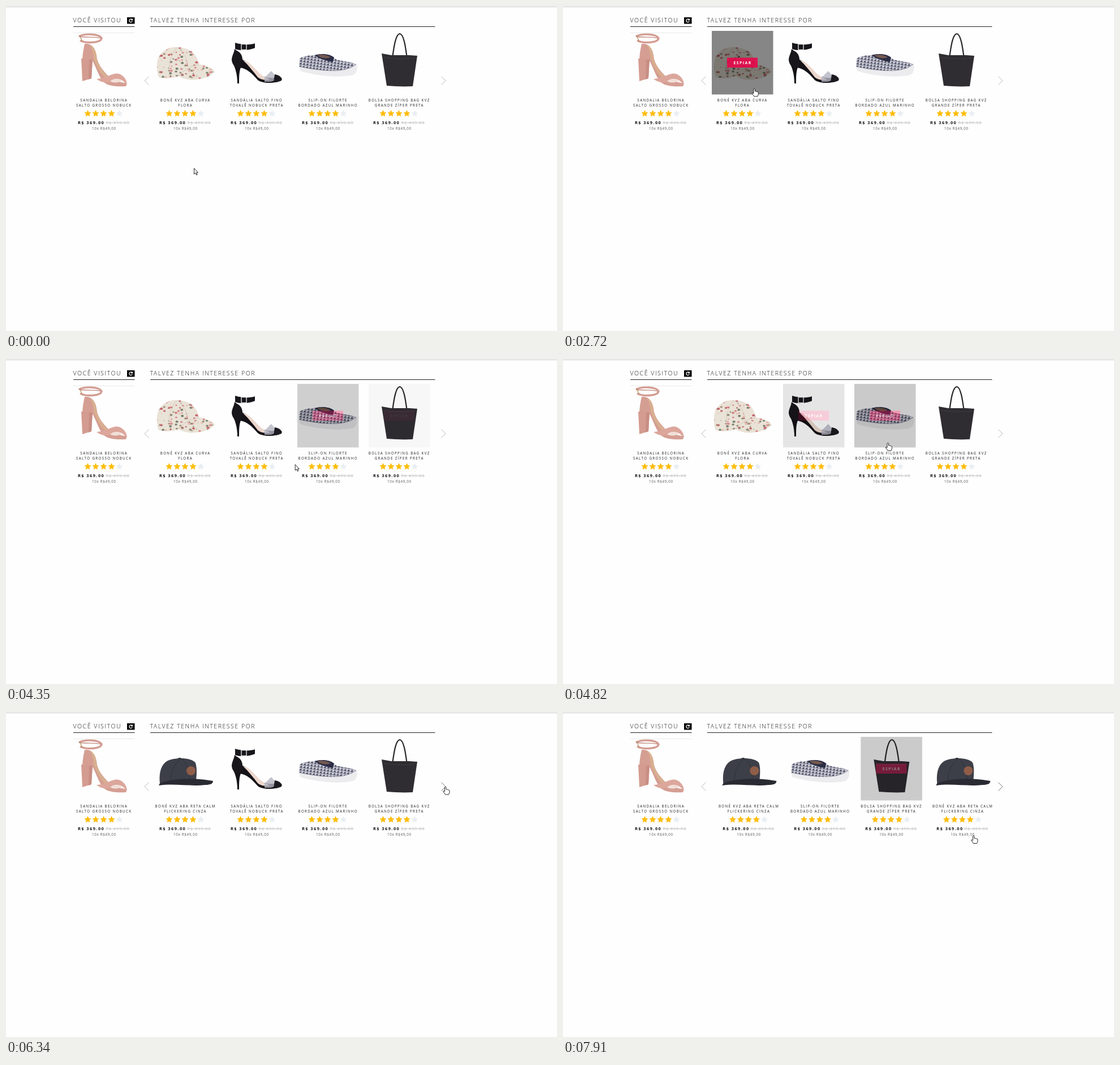
An HTML page for the animation above (8000 ms loop, 974 by 575 pixels).

```html
<!DOCTYPE html>
<html lang="pt-BR">
<head>
<meta charset="utf-8">
<title>Vitrine</title>
<style>
html, body { margin: 0; width: 100%; height: 100%; overflow: hidden; background: #fefefe; }
svg { display: block; width: 974px; height: 575px; font-family: "Open Sans", "Noto Sans", sans-serif; }
.head { font-size: 10.5px; font-weight: 300; letter-spacing: 1.55px; fill: #111; }
.name { font-size: 6.2px; letter-spacing: 1.38px; fill: #222; text-anchor: middle; }
.price { font-size: 7.4px; font-weight: 700; letter-spacing: 1.45px; fill: #111; }
.old { font-size: 7px; letter-spacing: 1.12px; fill: #bbb; }
.part { font-size: 6.2px; letter-spacing: .7px; fill: #555; text-anchor: middle; }
.peek { font-size: 6.8px; font-weight: 700; letter-spacing: 1.5px; fill: #fff; text-anchor: middle; }
</style>
</head>
<body>
<svg id="stage" viewBox="0 0 974 575"></svg>
<script>
const stage = document.getElementById('stage');
const STEP = 126, PAGE = 4 * STEP, FADE = 300, LOOP = 8000;
const clamp = (v, lo = 0, hi = 1) => Math.min(hi, Math.max(lo, v));
const path = (d, fill, extra = '') => `<path d="${d}" fill="${fill}" ${extra}/>`;
const line = (d, color, width) => path(d, 'none', `stroke="${color}" stroke-width="${width}"`);

let seed = 7;
const rand = () => (seed = seed * 16807 % 2147483647) / 2147483647;

const capShape = 'M-50 104C-50 88-38 74-20 73C5 72 20 82 24 103C36 105 50 110 52 117C46 122 36 129 20 130C5 132-5 128-12 124C-28 130-40 128-47 126C-50 120-50 110-50 104Z';
const slipUpper = 'M-50 93C-42 88-32 87-23 87C-10 83 4 85 10 91C16 98 36 97 50 103C44 108 36 112 20 114C0 116-30 112-51 107Z';

function flowers() {
  const tones = ['#d98f90', '#c4666c', '#77806c', '#e6b5ae', '#97907c'];
  let out = '';
  for (let i = 0; i < 130; i++) {
    const x = -50 + rand() * 102, y = 73 + rand() * 57, r = .8 + rand() * 1.9;
    out += `<ellipse cx="${x.toFixed(1)}" cy="${y.toFixed(1)}" rx="${r.toFixed(1)}" ry="${(r * .75).toFixed(1)}" fill="${tones[i % 5]}"/>`;
  }
  return out;
}

// Product pictures, drawn around x = 0
const pictures = {
  sandal: '<path d="M-54 47.5H54" stroke="#eaeaea"/>' +
    path('M-34 67C-20 65-13 78-12 94C-8 108 2 118 12 128C22 134 32 135 41 137L39 142C22 143 6 142-2 133C-10 122-14 108-20 97L-38 97C-38 86-36 76-34 67Z', '#d59e93') +
    path('M-25 69C-15 73-13 84-13 94C-8 108 0 118 9 127L3 128C-8 116-14 104-18 94C-18 84-20 76-25 69Z', '#d8b08f') +
    path('M-40 93L-20 94-22 128-38 133Z', '#d49c91') +
    path('M-20 95L-22 128-27 130-26 95Z', '#c88e84') +
    path('M-13 129C8 127 16 117 27 120C37 124 42 134 40 139C34 131 28 128 22 130C10 136-2 138-13 129Z', '#dca69b') +
    path('M11 133C17 128 25 127 32 132C27 136 18 137 11 133Z', '#f1dfd7') +
    line('M-44 54C-34 48-8 49-4 57C-5 65-30 67-42 61', '#d49c92', 3.4) +
    line('M-44 54C-30 56-14 54-5 57', '#c48a80', 1.3) +
    line('M-43 52L-38 63', '#b89468', 1.3),
  floral: path(capShape, '#e9e2d6') + `<g clip-path="url(#capClip)">${flowers()}</g>` +
    line('M24 104C8 106-4 114-12 124M-14 73C-2 84 4 95 5 108M-14 73C-28 86-30 105-28 126', '#cfc5b8', .8),
  heel: path('M-28 94C-10 98-2 118 12 125C24 129 36 126 44 127L44 132C30 138 10 137 2 131C-8 119-18 110-30 109Z', '#141216') +
    path('M-24 96C-8 99 0 118 13 125L24 130C14 132 7 130 2 126C-6 116-14 105-24 96Z', '#ecd7cd') +
    path('M-43 100L-26 105C-31 112-31 125-31 137H-34C-34 120-38 108-43 100Z', '#141216') +
    path('M-39 76L-35 79C-24 84-23 96-27 108C-32 112-42 108-44 96C-44 88-40 84-39 76Z', '#18161a') +
    path('M-38 65C-25 69-10 69-3 66V74C-12 78-28 80-38 76Z', '#18161a') +
    '<rect x="-27" y="67.5" width="9" height="10" fill="none" stroke="#eee" stroke-width="1.3"/>' +
    path('M14 126C20 122 23 117 26 115L33 123 31 132C25 135 20 134 14 134Z', '#b4b4c2', 'opacity=".8"') +
    path('M32 121C40 122 44 126 45 130C40 134 36 135 30 135Z', '#1c1a20'),
  slip: path('M-51 106C-30 112 0 116 20 114C36 112 44 107 51 102C53 110 51 119 45 122C20 128-25 123-49 115Z', '#ececee') +
    path(slipUpper, '#d9d9e0') + path(slipUpper, 'url(#weave)') +
    path('M-24 87C-10 83 4 85 11 91L9 99C-2 98-15 93-24 87Z', '#2c2e46') +
    path('M-19 87C-9 85 0 87 5 91C-4 94-13 92-19 87Z', '#765a50') +
    line('M-51 107C-30 112 0 116 20 114C36 112 44 108 50 103', '#77788a', .6),
  bag: line('M-12 92C-9 70-6 50 1 49C8 50 11 70 14 93', '#29262a', 2.2) +
    path('M-31 84L-14 87H18L32 88 24 142C8 143-8 142-22 141Z', '#302d32') +
    line('M-28 91C-8 94 12 94 28 92', '#424046', .8),
  grey: path('M-45 126C-47 105-42 88-25 84C-8 80 12 82 18 90C21 100 20 110 19 122Z', '#3d3f48') +
    line('M-8 82C-20 92-26 108-26 124M-8 82C3 90 8 105 8 120', '#2d2f37', .8) +
    path('M-45 126C-20 116 22 117 49 122C49 127 44 129 35 129C10 132-20 126-47 130Z', '#2a2a32') +
    '<circle cx="10" cy="104" r="8" fill="#8f5d48"/><ellipse cx="-10" cy="82" rx="3" ry="1" fill="#2a2a32"/>'
};

const titles = {
  sandal: ['SANDALIA BELORINA', 'SALTO GROSSO NOBUCK'],
  floral: ['BONÉ KVZ ABA CURVA', 'FLORA'],
  heel: ['SANDÁLIA SALTO FINO', 'TOVALÊ NOBUCK PRETA'],
  slip: ['SLIP-ON FILORTE', 'BORDADO AZUL MARINHO'],
  bag: ['BOLSA SHOPPING BAG KVZ', 'GRANDE ZÍPER PRETA'],
  grey: ['BONÉ KVZ ABA RETA CALM', 'FLICKERING CINZA']
};

function star(cx, color) {
  let pts = '';
  for (let i = 0; i < 10; i++) {
    const r = i % 2 ? 2.8 : 5.8, a = i * Math.PI / 5;
    pts += `${(cx + r * Math.sin(a)).toFixed(2)},${(190.4 - r * Math.cos(a)).toFixed(2)} `;
  }
  return `<polygon points="${pts}" fill="${color}" stroke="${color}" stroke-width=".6" stroke-linejoin="round"/>`;
}

function card(kind, x) {
  const stars = [-28.5, -14.5, -.5, 13.5, 27.5].map((sx, i) => star(sx, i < 4 ? '#fdbd0b' : '#e9eef3')).join('');
  return `<g transform="translate(${x})">${pictures[kind]}
    <g class="veil" opacity="0">
      <rect x="-54" y="44" width="108.5" height="112.5" fill="#000" opacity=".5"/>
      <rect x="-27" y="91.5" width="54" height="17.5" fill="#dc0546"/>
      <text class="peek" x=".5" y="103">ESPIAR</text>
    </g>
    <text class="name" x=".2" y="169">${titles[kind][0]}</text>
    <text class="name" x=".2" y="177.5">${titles[kind][1]}</text>${stars}
    <text class="price" x="-46" y="208.7">R$ 369.00</text>
    <text class="old" x="3.5" y="208.5">R$ 499.00</text>
    <path d="M3.5 206.5H45" stroke="#bbb" stroke-width=".8"/>
    <text class="part" x=".3" y="219.3">10x R$49,00</text></g>`;
}

const row = ('floral heel slip bag grey heel slip bag ' +
  'heel slip bag grey grey slip bag grey').split(' ');

stage.innerHTML = `<defs>
  <clipPath id="window"><rect x="255" y="40" width="504" height="200"/></clipPath>
  <clipPath id="capClip"><path d="${capShape}"/></clipPath>
  <pattern id="weave" width="6" height="5" patternUnits="userSpaceOnUse" patternTransform="rotate(8)">
    <path d="M0 4L3 0 5 4ZM4 .5H6M0 4.5H6" fill="#44465f" stroke="#7b7d90" stroke-width=".4"/></pattern></defs>
  <rect width="974" height="575" fill="#fefefe"/>
  <path d="M0 1.5H974" stroke="#c9c9c9"/>
  <text class="head" x="118.5" y="28.7">VOCÊ VISITOU</text>
  <text class="head" x="254.5" y="28.7">TALVEZ TENHA INTERESSE POR</text>
  <path d="M119 36.5H227.5M255 36.5H758.5" stroke="#222"/>
  <rect x="214" y="20" width="13.5" height="11.5" fill="#000"/>
  <path d="M222.6 23.8A2.8 2.8 0 1 0 223.2 27" fill="none" stroke="#fff" stroke-width="1.3"/>
  <path d="M224 22V25.6H220.4Z" fill="#fff"/>
  ${card('sandal', 173)}
  <g clip-path="url(#window)"><g id="track">${row.map((k, i) => card(k, 317 + i * STEP)).join('')}</g></g>
  <path d="M252.5 124.5L245 132 252.5 139.5" fill="none" stroke="#bbb"/>
  <path id="next" d="M769.5 124.5L777 132 769.5 139.5" fill="none"/>
  <circle id="click" cx="776" cy="132" r="8" fill="#fff200" opacity=".65"/>
  <g id="cursor" stroke="#111" stroke-width=".9" stroke-linejoin="round" fill="#fff">
    <path id="arrow" d="M.5 0V10.5L2.9 8.3 4.6 12 6.2 11.3 4.6 7.8H7.5Z"/>
    <path id="hand" d="M-1.5 1Q-.2-.6 1 1V5Q2.4 3.9 3.2 5.6Q4.6 4.5 5.2 6.2Q6.7 5.5 7 7.4V10Q6.6 12 5.6 14H-.5Q-2.2 11.3-4.3 8.6Q-4.4 6.6-1.5 8.8Z"/>
  </g>`;

const el = id => document.getElementById(id);
const veils = [...document.querySelectorAll('.veil')];
const show = (id, on) => el(id).style.display = on ? '' : 'none';

// [veil, pointer enters, pointer leaves]
const hovers = [
  [0, 1250, 2050], [1, 2440, 2790], [2, 2880, 3080], [3, 3130, 3360],
  [4, 3760, 4068], [3, 4080, 4270], [2, 4440, 4660], [3, 4700, 4900],
  [4, 4930, 5390], [15, 7790, 7990]
];

// [time, x, y] of the pointer tip
const moves = [
  [860, 332, 287], [1020, 310, 264], [1400, 205, 162], [1610, 186, 141],
  [1840, 186, 141], [2080, 228, 185], [2200, 255, 196], [2420, 310, 168], [2630, 338, 146],
  [2720, 338, 146], [2900, 405, 148], [3180, 548, 150], [3460, 644, 178],
  [3500, 644, 178], [3680, 690, 211], [3800, 700, 150], [4080, 610, 130], [4270, 530, 165], [4350, 511, 187],
  [4460, 478, 150], [4600, 462, 142], [4760, 545, 150], [5080, 700, 140],
  [5130, 700, 140], [5350, 742, 145], [5450, 760, 134], [5900, 777, 132],
  [7390, 777, 132], [7600, 765, 140], [7800, 738, 165], [7910, 726, 218.5]
];

function pointer(t) {
  const i = moves.findIndex(m => m[0] > t);
  if (i === 0) return moves[0].slice(1);
  if (i < 0) return moves.at(-1).slice(1);
  const [a, b] = [moves[i - 1], moves[i]], p = (t - a[0]) / (b[0] - a[0]);
  return [a[1] + (b[1] - a[1]) * p, a[2] + (b[2] - a[2]) * p];
}

const swing = (t, start, end) => .5 - Math.cos(Math.PI * clamp((t - start) / (end - start))) / 2;

function hover(t, enter, leave) {
  const peak = Math.min(1, (leave - enter) / FADE);
  return clamp(Math.min((t - enter) / FADE, peak - (t - leave) / FADE));
}

function draw(time) {
  const t = Math.min(time, 7910);
  const page = swing(t, 6090, 6340) + swing(t, 6450, 6650) + swing(t, 7684, 7934);
  el('track').setAttribute('transform', `translate(${-page * PAGE})`);

  const shade = veils.map(() => 0);
  for (const [i, enter, leave] of hovers) shade[i] = Math.max(shade[i], hover(t, enter, leave));
  veils.forEach((v, i) => v.setAttribute('opacity', shade[i]));

  const [x, y] = pointer(t);
  const onCard = y < 157 && [173, 317, 443, 569, 695].some(c => Math.abs(x - c) < 54.5);
  const hand = onCard || x > 755 || t >= 7390;
  el('cursor').setAttribute('transform', `translate(${x} ${y})`);
  show('hand', hand);
  show('arrow', !hand);
  show('click', t >= 7390 && t < 7530);
  el('next').setAttribute('stroke', t > 5600 ? '#777' : '#bbb');
}

const begin = performance.now();
function tick() {
  draw((performance.now() - begin) % LOOP);
  requestAnimationFrame(tick);
}
tick();
</script>
</body>
</html>
```
